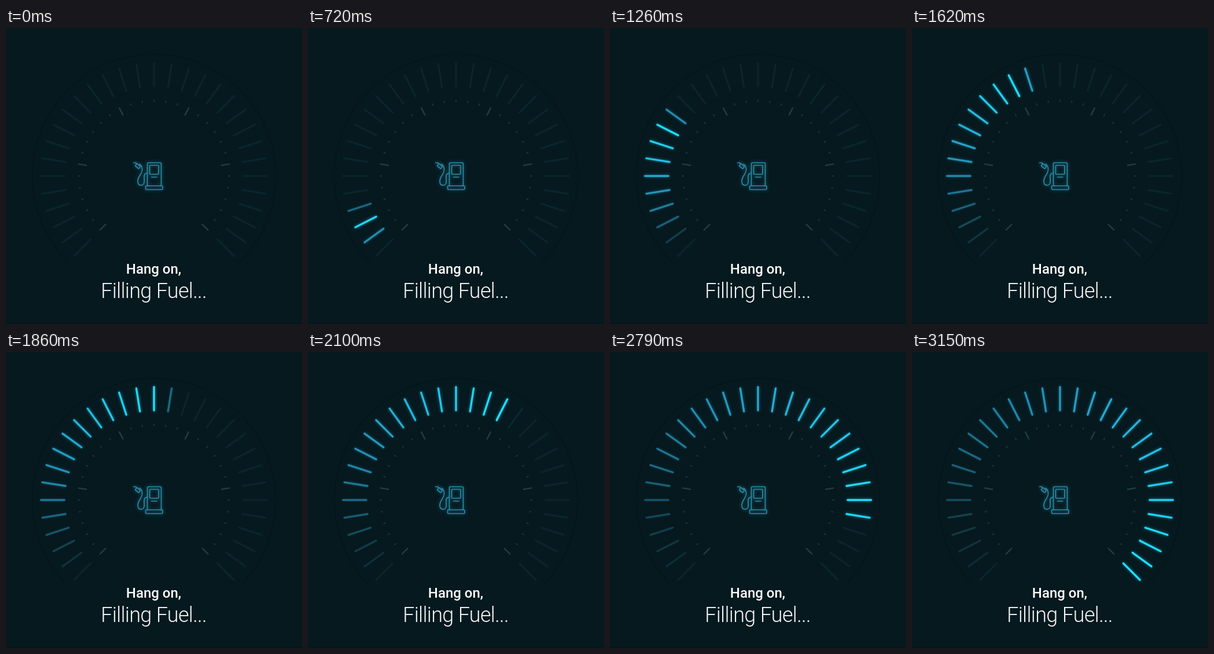
Write an HTML page with a canvas that moves like this. It is 512x512 px and loops after 3630 ms.

```html
<!DOCTYPE html>
<html lang="en">
<head>
<meta charset="utf-8">
<title>Filling Fuel</title>
<style>
html, body { margin: 0; width: 100%; height: 100%; overflow: hidden; background: #06191f; }
canvas { display: block; width: 512px; height: 512px; }
</style>
</head>
<body>
<canvas id="stage"></canvas>
<script>
const SIZE = 512, MID = 256, LOOP = 3630, STEP = 30;
const FILL_START = 570, FILL_END = 3150, LAST = 30;
const BASE = [11, 36, 44];
// Glow colour from the cold end of the sweep to its head
const RAMP = [
  [0, BASE], [0.12, [18, 62, 74]], [0.25, [26, 100, 125]], [0.4, [33, 135, 170]],
  [0.6, [37, 170, 210]], [0.8, [32, 202, 237]], [1, [30, 226, 255]]
];

const canvas = document.getElementById('stage');
const ctx = canvas.getContext('2d');
const dpr = window.devicePixelRatio || 1;
canvas.width = canvas.height = SIZE * dpr;
ctx.scale(dpr, dpr);

const clamp = v => Math.max(0, Math.min(1, v));
const rgb = (c, a = 1) => `rgba(${c.map(Math.round).join(',')},${a})`;

function ramp(u) {
  let k = 1;
  while (k < RAMP.length - 1 && u > RAMP[k][0]) k++;
  const [u0, c0] = RAMP[k - 1], [u1, c1] = RAMP[k];
  const f = clamp((u - u0) / (u1 - u0));
  return c0.map((v, j) => v + (c1[j] - v) * f);
}

// Tick 0 sits at the lower left; each step turns 9 degrees clockwise
const tickAngle = i => (135 + i * 9) * Math.PI / 180;

function radial(i, r0, r1, color, width) {
  const a = tickAngle(i), x = Math.cos(a), y = Math.sin(a);
  ctx.strokeStyle = color;
  ctx.lineWidth = width;
  ctx.beginPath();
  ctx.moveTo(MID + x * r0, MID + y * r0);
  ctx.lineTo(MID + x * r1, MID + y * r1);
  ctx.stroke();
}

function glow(color, blur) {
  ctx.shadowColor = color;
  ctx.shadowBlur = blur * dpr;
}

function drawDial(head) {
  ctx.lineCap = 'round';
  ctx.strokeStyle = '#05151a';
  ctx.lineWidth = 1.5;
  ctx.beginPath();
  ctx.arc(MID, MID, 210.5, tickAngle(0), tickAngle(LAST));
  ctx.stroke();

  for (let i = 0; i <= LAST; i++) {
    if (i % 6) radial(i, 129, 131, '#15323a', 2.4);
    else radial(i, 118.5, 132, '#213d43', 2.4);

    const heat = head > 1 ? Math.min(clamp(i / (head - 1)), clamp(head - i)) : 0;
    const c = ramp(heat);
    ctx.save();
    if (heat > 0.1) glow(rgb(c, 0.55 * Math.min(1, heat * 2)), 5);
    radial(i, 155, 195.5, rgb(c), 3.4);
    ctx.restore();
  }
}

function drawPump() {
  ctx.save();
  ctx.strokeStyle = '#2a8ca6';
  ctx.lineWidth = 1.7;
  ctx.lineJoin = 'round';
  glow('rgba(38,150,180,0.7)', 6);
  ctx.beginPath();
  ctx.roundRect(244.5, 233, 24, 40, 2);
  ctx.roundRect(248.5, 237.5, 15.5, 15.5, 1.5);
  ctx.roundRect(241.5, 273, 29.5, 6.5, 1.5);
  ctx.moveTo(251.5, 258);
  ctx.lineTo(261, 258);
  ctx.stroke();
  ctx.stroke(new Path2D(
    'M220.5 233H224L226.5 235M231 235.5Q235 238 235.5 243' +
    'C237 252 228 256 228 265C228 274 238 274 239 267C240 261 236 252 244 251'));
  ctx.translate(228, 239);
  ctx.rotate(0.7);
  ctx.beginPath();
  ctx.roundRect(-4, -2.5, 8, 5, 1);
  ctx.stroke();
  ctx.restore();
}

function label(text, y, font, color, spacing) {
  ctx.font = font + ' Roboto, "Open Sans", sans-serif';
  ctx.letterSpacing = spacing;
  ctx.fillStyle = color;
  ctx.textAlign = 'center';
  ctx.fillText(text, 255.5, y);
}

function draw(t) {
  ctx.fillStyle = '#06191f';
  ctx.fillRect(0, 0, SIZE, SIZE);
  ctx.fillStyle = '#05151a';
  ctx.fillRect(0, 510, SIZE, 2);

  const head = t < FILL_START ? 0
    : LAST + 1 - (FILL_END - Math.min(t, FILL_END)) / 87.6;
  drawDial(head);
  drawPump();
  label('Hang on,', 425, '500 24px', '#ffffff', '0px');
  label('Filling Fuel...', 467, '300 36px', '#f4f6f6', '-0.7px');
}

const start = performance.now();
function tick() {
  const t = (performance.now() - start) % LOOP;
  draw(Math.floor(t / STEP) * STEP);
  requestAnimationFrame(tick);
}
tick();
</script>
</body>
</html>
```
